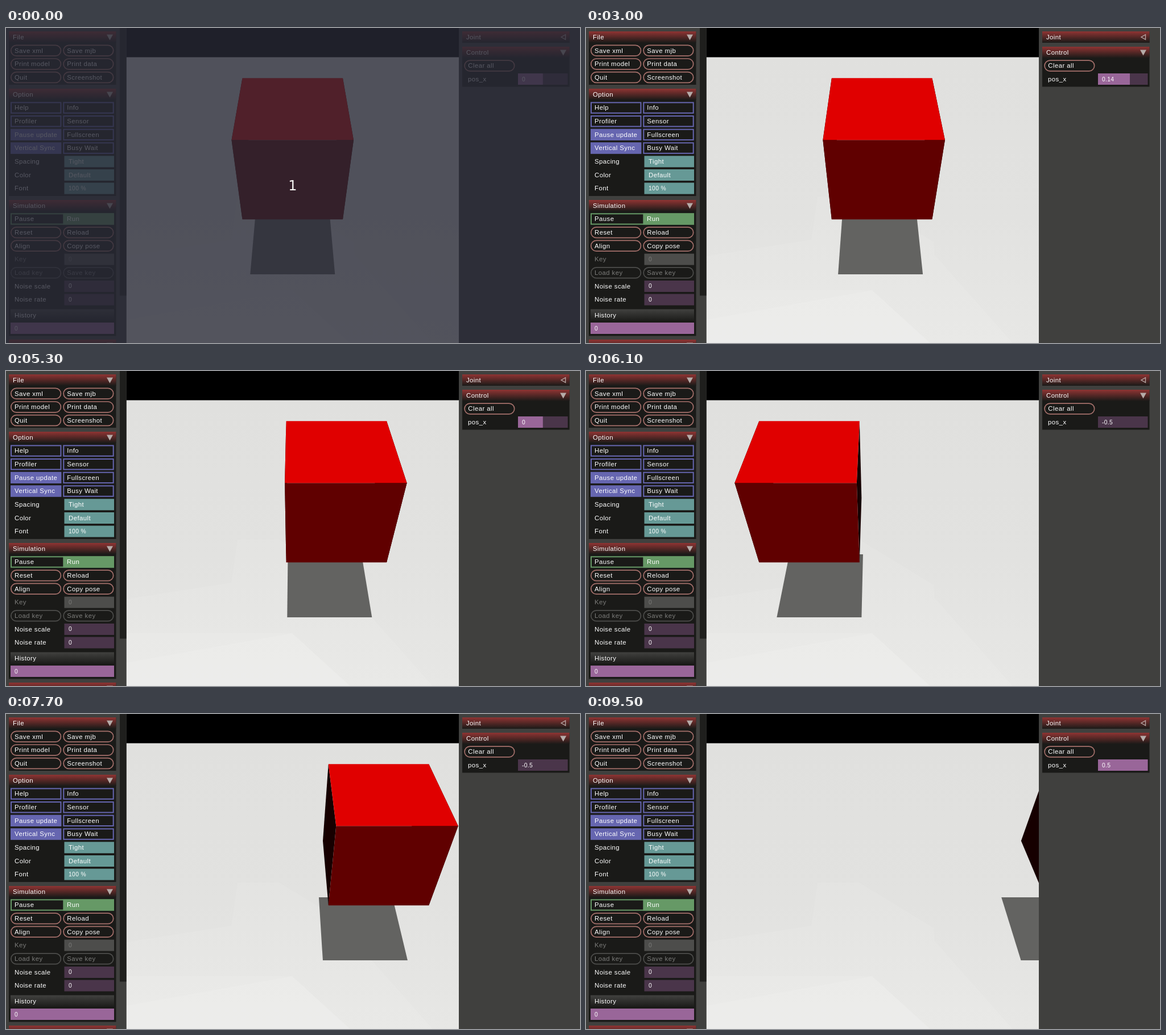
An HTML page that plays this animation: 1009 px wide and 555 px high, repeating every 9700 ms.

```html
<!DOCTYPE html>
<html lang="en">
<head>
<meta charset="utf-8">
<title>Cube on a slide joint</title>
<style>
html, body { margin: 0; width: 100%; height: 100%; overflow: hidden; background: #40403e; }
svg { display: block; }
text { font: 11.4px "Liberation Sans", Arial, sans-serif; letter-spacing: .42px; fill: #fff; white-space: pre; }
text.num { font-size: 10.3px; letter-spacing: .35px; }
text.count { font: 24px "DejaVu Sans", sans-serif; letter-spacing: 0; fill: #f4f4f2; }
</style>
</head>
<body>
<svg id="stage" width="1009" height="555" viewBox="0 0 1009 555">
  <defs>
    <linearGradient id="red" x2="0" y2="1"><stop stop-color="#8f3433"/><stop offset="1" stop-color="#1a1a18"/></linearGradient>
    <linearGradient id="grey" x2="0" y2="1"><stop stop-color="#41413f"/><stop offset="1" stop-color="#1d1d1b"/></linearGradient>
    <linearGradient id="floor" x2="0" y2="1"><stop stop-color="#e0e0de"/><stop offset=".55" stop-color="#e2e2e0"/><stop offset="1" stop-color="#e7e7e5"/></linearGradient>
    <clipPath id="view"><rect x="211.5" width="584.5" height="555"/></clipPath>
  </defs>
  <g clip-path="url(#view)">
    <rect x="211" width="586" height="555"/>
    <rect x="211" y="51.5" width="586" height="504" fill="url(#floor)"/>
    <g fill="#fff" fill-opacity=".07">
      <path d="M407 297L396 373L211 402V555H750L613 400L611 377L480 297Z"/>
      <path d="M211 462L503 462L605 555H211Z"/>
      <path d="M211 514L503 462L605 555H211Z"/>
    </g>
    <polygon id="shadow" fill="#636361"/>
    <polygon id="left" fill="#160000"/>
    <polygon id="right" fill="#160000"/>
    <polygon id="front" fill="#600000"/>
    <polygon id="top" fill="#e00000"/>
  </g>
  <g id="ui"></g>
  <g id="intro">
    <rect width="1009" height="555" fill="#282a36" fill-opacity=".78"/>
    <text class="count" x="504" y="286" text-anchor="middle">1</text>
  </g>
</svg>
<script>
const $ = id => document.getElementById(id);
const LOOP = 9700, STEP = 100;
const BLUE = '#6666b0', TEAL = '#669996', GREEN = '#669966', PINK = '#996699', PLUM = '#4a354a',
      ROSE = '#a5706b', DIM = '#4d4d4b', FADED = '#7c7c7a';

// Interface parts; y is the middle of a row
const rect = (x, y, w, h, fill, extra = '') =>
  `<rect x="${x}" y="${y}" width="${w}" height="${h}" fill="${fill}" ${extra}/>`;
const text = (x, y, s, extra = '') => `<text x="${x}" y="${y + 4}" ${extra}>${s}</text>`;
const ink = color => color ? `style="fill:${color}"` : '';

function panel(x, y, h, title, closed) {
  const w = 188.5, r = x + w;
  const mark = closed
    ? `<path d="M${r - 7} ${y + 5.7}V${y + 14.3}L${r - 14.5} ${y + 10}Z" fill="none" stroke="#b5a5a3" stroke-width="1.4"/>`
    : `<path d="M${r - 16.5} ${y + 5.5}H${r - 5.5}L${r - 11} ${y + 15.5}Z" fill="#b5aca9"/>`;
  return rect(x, y, w, h, '#1a1a18') + rect(x, y, w, 20, 'url(#red)') + text(x + 7, y + 10, title) + mark;
}

function button(x, y, label, off) {
  return rect(x + .8, y - 9.3, 87.6, 18.8, 'none', `rx="9.4" stroke="${off ? DIM : ROSE}" stroke-width="1.7"`) +
    text(x + 7, y, label, ink(off && FADED));
}

function toggle(x, y, label, on) {
  return rect(x + 1, y - 9, 87.4, 18.4, on ? BLUE : 'none', `stroke="${BLUE}" stroke-width="2"`) + text(x + 7, y, label);
}

function field(y, label, value, fill, cls, off) {
  return text(15, y, label, ink(off && FADED)) + rect(102.5, y - 9.8, 87.5, 20, fill) +
    text(110, y - (cls ? .5 : 0), value, `class="${cls}" ${ink(off && FADED)}`);
}

const pair = (make, y, a, b, onA) => make(8, y, a, onA) + make(100.3, y, b, onA && make === button);
const row = (base, n) => +(base + 23.67 * n).toFixed(1);

function buildUi() {
  const file = n => row(39.6, n), opt = n => row(140.4, n), sim = n => row(336.4, n);
  $('ui').innerHTML = [
    rect(0, 0, 211.5, 555, '#40403e'), rect(796, 0, 213, 555, '#40403e'),
    rect(200, 0, 11.5, 471.5, '#1f1f1d'),

    panel(5, 6, 94, 'File'),
    pair(button, file(0), 'Save xml', 'Save mjb'),
    pair(button, file(1), 'Print model', 'Print data'),
    pair(button, file(2), 'Quit', 'Screenshot'),

    panel(5, 107, 189, 'Option'),
    pair(toggle, opt(0), 'Help', 'Info'),
    pair(toggle, opt(1), 'Profiler', 'Sensor'),
    pair(toggle, opt(2), 'Pause update', 'Fullscreen', true),
    pair(toggle, opt(3), 'Vertical Sync', 'Busy Wait', true),
    field(opt(4), 'Spacing', 'Tight', TEAL, ''),
    field(opt(5), 'Color', 'Default', TEAL, ''),
    field(opt(6), 'Font', '100 %', TEAL, 'num'),

    panel(5, 303, 239.5, 'Simulation'),
    rect(9, 327.3, 180, 18.3, 'none', `stroke="${GREEN}" stroke-width="2"`),
    rect(100.3, 326.5, 89.7, 20, GREEN),
    text(15, sim(0), 'Pause'), text(107, sim(0), 'Run'),
    pair(button, sim(1), 'Reset', 'Reload'),
    pair(button, sim(2), 'Align', 'Copy pose'),
    field(sim(3), 'Key', '0', DIM, 'num', true),
    pair(button, sim(4), 'Load key', 'Save key', true),
    field(sim(5), 'Noise scale', '0', PLUM, 'num'),
    field(sim(6), 'Noise rate', '0', PLUM, 'num'),
    rect(8, 495.5, 182, 20, 'url(#grey)'), text(15, 505.5, 'History'),
    rect(8, 519, 182, 20, PINK), text(15, 528.5, '0', 'class="num"'),
    panel(5, 549, 30, 'Physics'),

    panel(802, 6, 20, 'Joint', true),
    panel(802, 33, 70.5, 'Control'),
    button(805.3, 66.4, 'Clear all'),
    text(812, 90, 'pos_x'),
    rect(900, 80, 87.5, 20, PLUM), rect(900, 80, 0, 20, PINK, 'id="bar"'),
    text(907, 89.5, '', 'class="num" id="value"')
  ].join('');
}

// Slider value dragged by the user: time, value
const drag = [
  [1700, 0], [1800, -.12], [1900, -.14], [2200, .1], [2600, .125], [3000, .14], [3400, .2], [3800, .2],
  [4300, .49], [4400, .5], [5100, .5], [5500, -.5], [6250, -.5], [6600, .5], [7200, .5],
  [7550, -.5], [8150, -.5], [8500, .475], [8600, .5]
];
// Turning points of the cube: time, offset in cube widths
const swings = [
  [1800, 0], [2320, -.043], [3300, .13], [4180, .029], [5370, .44],
  [6428, -.93], [7440, 1.36], [8440, -1.83], [9455, 2.27]
];

// The last pair is continued past its end
function between(keys, t, ease) {
  let i = 0;
  while (i < keys.length - 2 && t >= keys[i + 1][0]) i++;
  const [t0, a] = keys[i], [t1, b] = keys[i + 1];
  return a + (b - a) * ease(Math.max(0, (t - t0) / (t1 - t0)));
}
const linear = p => Math.min(p, 1);
const swing = p => (1 - Math.cos(Math.PI * p)) / 2;

function drawCube(u) {
  // Each edge parallel to the slide: projected width and height on the stage
  const edge = (w, y) => [-.5, .5].map(s => `${(503.75 + w * (u + s)).toFixed(2)},${y}`);
  const topBack = edge(176.5, 88.3), topFront = edge(214.5, 197.3),
        lowFront = edge(176.5, 337.3), lowBack = edge(149.2, 223.5),
        shadeBack = edge(129.4, 323), shadeFront = edge(149, 434);
  const quad = (id, a, b) => $(id).setAttribute('points', [a[0], a[1], b[1], b[0]].join(' '));
  quad('shadow', shadeBack, shadeFront);
  quad('top', topBack, topFront);
  quad('front', topFront, lowFront);
  ['left', 'right'].forEach((id, s) =>
    $(id).setAttribute('points', [topFront[s], topBack[s], lowBack[s], lowFront[s]].join(' ')));
}

function draw(time) {
  const t = Math.min(Math.floor((time % LOOP) / STEP) * STEP, 9500);
  const ctrl = Math.round(between(drag, t, linear) * 200) / 200;
  drawCube(between(swings, t, swing));
  $('bar').setAttribute('width', 87.5 * (ctrl + .5));
  $('value').textContent = String(+ctrl.toFixed(3));
  $('intro').style.display = t < STEP ? '' : 'none';
}

buildUi();
const start = performance.now();
function tick() {
  draw(performance.now() - start);
  requestAnimationFrame(tick);
}
tick();
</script>
</body>
</html>
```
